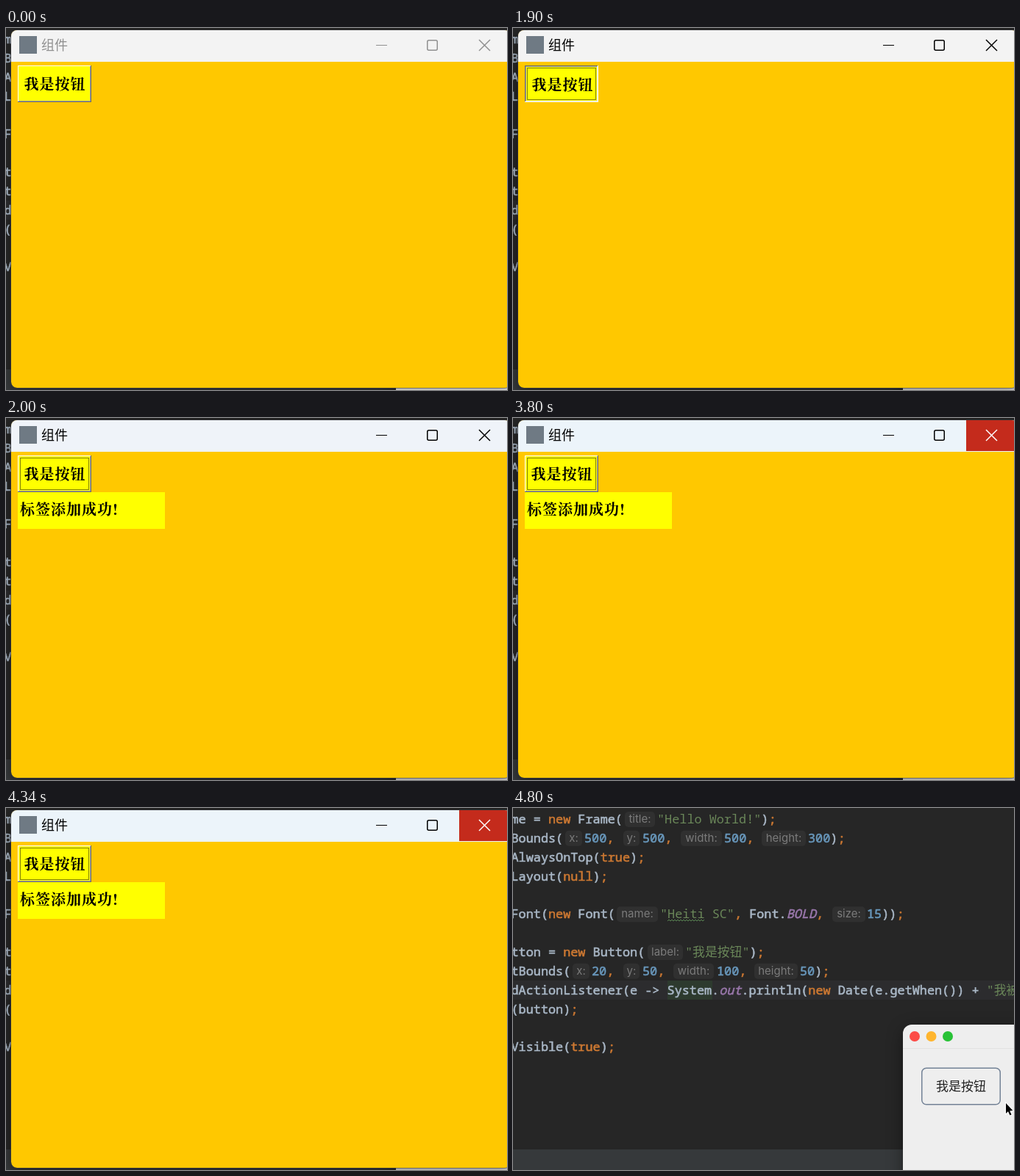
These frames come from a looping animation (681 px wide and 493 px high, 5 s). An HTML page with a canvas:

```html
<!DOCTYPE html>
<html lang="zh">
<head>
<meta charset="utf-8">
<title>组件</title>
<style>
html, body { margin: 0; width: 681px; height: 493px; overflow: hidden; background: #262626; }
canvas { display: block; }
</style>
</head>
<body>
<canvas id="stage" width="681" height="493"></canvas>
<script>
const W = 681, H = 493, LOOP = 5000, PAD = 20;
const MONO = '"Noto Sans Mono", "Noto Sans CJK SC", monospace';
const SANS = '"Noto Sans CJK SC", "Noto Sans CJK", sans-serif';
const SERIF = '"Noto Serif CJK SC", "Noto Sans CJK SC", "Noto Sans CJK", serif';
const CODE_SIZE = 16.84, CODE_X = -2.5, BASE_Y = 21, LINE_H = 25.85;
const INK = { p: '#a9b7c6', k: '#cc7832', s: '#6a8759', n: '#6897bb', f: '#9876aa' };

const ctx = document.getElementById('stage').getContext('2d');
const layer = document.createElement('canvas');
layer.width = 720 + PAD;
layer.height = 520 + PAD;
const win = layer.getContext('2d');

// Line number, then tokens [style, text, x]; without x a token follows the one before.
// Style h is a parameter hint: [h, text, left, right].
const CODE = [
  [0, ['p', 'me = '], ['k', 'new'], ['p', ' Frame('], ['h', 'title:', 152, 193],
    ['s', '"Hello World!"', 196], ['p', ')'], ['k', ';']],
  [1, ['p', 'Bounds('], ['h', 'x:', 71, 94], ['n', '500', 97], ['k', ','],
    ['h', 'y:', 150, 172], ['n', '500', 176], ['k', ','],
    ['h', 'width:', 228, 284], ['n', '500', 287], ['k', ','],
    ['h', 'height:', 338, 398], ['n', '300', 401], ['p', ')'], ['k', ';']],
  [2, ['p', 'AlwaysOnTop('], ['k', 'true'], ['p', ')'], ['k', ';']],
  [3, ['p', 'Layout('], ['k', 'null'], ['p', ')'], ['k', ';']],
  [5, ['p', 'Font('], ['k', 'new'], ['p', ' Font('], ['h', 'name:', 141, 197],
    ['s', '"Heiti SC"', 200], ['k', ', '], ['p', 'Font.'], ['f', 'BOLD'], ['k', ','],
    ['h', 'size:', 434, 479], ['n', '15', 481], ['p', '))'], ['k', ';']],
  [7, ['p', 'tton = '], ['k', 'new'], ['p', ' Button('], ['h', 'label:', 183, 231],
    ['s', '"我是按钮"', 234], ['p', ')'], ['k', ';']],
  [8, ['p', 'tBounds('], ['h', 'x:', 81, 104], ['n', '20', 107], ['k', ','],
    ['h', 'y:', 150, 172], ['n', '50', 176], ['k', ','],
    ['h', 'width:', 218, 273], ['n', '100', 277], ['k', ','],
    ['h', 'height:', 328, 387], ['n', '50', 390], ['p', ')'], ['k', ';']],
  [9, ['p', 'dActionListener(e -> System.'], ['f', 'out'], ['p', '.println('], ['k', 'new'],
    ['p', ' Date(e.getWhen()) + '], ['s', '"我被']],
  [10, ['p', '(button)'], ['k', ';']],
  [12, ['p', 'Visible('], ['k', 'true'], ['p', ')'], ['k', ';']]
];

function box(c, x, y, w, h, color) {
  c.fillStyle = color;
  c.fillRect(x, y, w, h);
}

function round(c, x, y, w, h, r) {
  c.beginPath();
  c.roundRect(x, y, w, h, r);
}

function poly(c, pts) {
  c.beginPath();
  pts.forEach(([x, y], i) => i ? c.lineTo(x, y) : c.moveTo(x, y));
}

function label(c, text, x, y, font, color, align = 'left') {
  c.font = font;
  c.fillStyle = color;
  c.textAlign = align;
  c.fillText(text, x, y);
}

function shadow(c, color, blur, dy) {
  c.shadowColor = color;
  c.shadowBlur = blur;
  c.shadowOffsetY = dy;
}

function hint(text, left, right, y) {
  round(ctx, left, y - 16, right - left, 21, 5);
  ctx.fillStyle = '#303030';
  ctx.fill();
  label(ctx, text, (left + right) / 2, y - 1, '15px Inter, sans-serif', '#7b7b7b', 'center');
}

function drawCode() {
  for (const [row, ...tokens] of CODE) {
    const y = BASE_Y + row * LINE_H;
    let x = CODE_X;
    for (const [style, text, at, right] of tokens) {
      if (style === 'h') {
        hint(text, at, right, y);
        continue;
      }
      if (at !== undefined) x = at;
      const face = style === 'f' ? 'italic ' : '';
      label(ctx, text, x, y, `${face}${CODE_SIZE}px ${MONO}`, INK[style]);
      // a hairline outline gives the medium weight; strings stay lighter
      if (style !== 's') {
        ctx.strokeStyle = INK[style];
        ctx.lineWidth = 0.6;
        ctx.strokeText(text, x, y);
      }
      x += ctx.measureText(text).width;
    }
  }
  // spelling mark
  const wave = [];
  for (let x = 210; x <= 260; x += 2) wave.push([x, x % 4 ? 154 : 152]);
  poly(ctx, wave);
  ctx.strokeStyle = '#5c8a55';
  ctx.lineWidth = 1;
  ctx.stroke();
}

function drawMacWindow() {
  ctx.save();
  shadow(ctx, 'rgba(0,0,0,.4)', 22, 6);
  round(ctx, 530, 295, 300, 300, 12);
  ctx.fillStyle = '#eeeeee';
  ctx.fill();
  ctx.restore();
  box(ctx, 530, 327, 151, 1, '#e2e2e2');
  ['#fc4b47', '#ffb52e', '#28c236'].forEach((color, i) => {
    ctx.beginPath();
    ctx.arc(546 + 22.5 * i, 311, 7, 0, 7);
    ctx.fillStyle = color;
    ctx.fill();
  });
  round(ctx, 555.75, 354.25, 106.5, 49.5, 6);
  ctx.strokeStyle = '#738296';
  ctx.lineWidth = 1.5;
  ctx.stroke();
  label(ctx, '我是按钮', 609, 385, '17px ' + SANS, '#222', 'center');
}

function drawCursor() {
  poly(ctx, [[670, 402], [670, 416], [673, 413.2], [675.4, 418.6],
    [677.6, 417.6], [675.2, 412.4], [679.4, 412]]);
  ctx.closePath();
  ctx.strokeStyle = '#fff';
  ctx.lineWidth = 2;
  ctx.stroke();
  ctx.fillStyle = '#000';
  ctx.fill();
}

function drawDesktop() {
  box(ctx, 0, 0, W, H, '#262626');
  box(ctx, 0, 235, W, 26, '#2c2c2e');
  box(ctx, 210, 235, 61, 26, '#2d3a2e');
  box(ctx, 0, 465, W, 28, '#36393b');
  drawCode();
  drawMacWindow();
  drawCursor();
}

function drawControls(color, { hover, closing }) {
  win.strokeStyle = color;
  win.lineWidth = 1;
  poly(win, [[503, 23.5], [518, 23.5]]);
  win.stroke();
  win.lineWidth = 1.5;
  round(win, 572.75, 16.75, 13.5, 13.5, 2);
  win.stroke();
  if (hover) {
    box(win, 616, 3, 80, 42, '#c42b1c');
    win.strokeStyle = '#fff';
  }
  if (closing) return;
  poly(win, [[643, 16], [658, 31]]);
  win.stroke();
  poly(win, [[658, 16], [643, 31]]);
  win.stroke();
}

function bevel(x, y, w, h, light, dark) {
  box(win, x, y, w, h, dark);
  box(win, x, y, w - 1, h - 1, light);
}

function drawButton({ pressed, active }) {
  if (pressed) {
    bevel(16, 51, 100, 50, '#696969', '#ffffff');
    bevel(17, 52, 98, 48, '#a0a0a0', '#e3e3e3');
  } else {
    bevel(16, 51, 100, 50, '#ffffff', '#696969');
    bevel(17, 52, 98, 48, '#ffff00', '#a0a0a0');
  }
  box(win, 18, 53, 96, 46, '#ffff00');
  if (active) {
    win.setLineDash([1, 1]);
    win.strokeStyle = '#000';
    win.lineWidth = 1;
    win.strokeRect(19.5, 54.5, 93, 43);
    win.setLineDash([]);
  }
  const d = pressed ? 1 : 0;
  win.letterSpacing = '1px';
  label(win, '我是按钮', 24.5 + d, 83.5 + d, 'bold 20px ' + SERIF, '#000');
  win.letterSpacing = '0px';
}

function drawWindow(s) {
  win.setTransform(1, 0, 0, 1, 0, 0);
  win.clearRect(0, 0, layer.width, layer.height);
  win.translate(PAD, PAD);

  win.save();
  shadow(win, s.active ? 'rgba(0,0,0,.5)' : 'rgba(0,0,0,.35)', 14, 3);
  round(win, 7, 3, 679, 487, 8);
  win.fillStyle = '#ffc800';
  win.fill();
  win.restore();
  round(win, 6.5, 2.5, 680, 488, 8.5);
  win.strokeStyle = 'rgba(62,62,66,.6)';
  win.lineWidth = 1;
  win.stroke();

  win.save();
  round(win, 7, 3, 679, 487, 8);
  win.clip();
  box(win, 7, 3, 679, 43, s.bar);
  const ink = s.active ? '#000' : '#909090';
  box(win, 18, 11, 24, 24, '#6f7a84');
  label(win, '组件', 48, 30, '18px ' + SANS, ink);
  drawControls(ink, s);
  drawButton(s);
  if (s.added) {
    box(win, 16, 101, 200, 50, '#ffff00');
    win.letterSpacing = '1px';
    label(win, '标签添加成功!', 19, 131.5, 'bold 20px ' + SERIF, '#000');
    win.letterSpacing = '0px';
  }
  win.restore();
}

function stateAt(t) {
  return {
    active: t >= 1900,
    pressed: t >= 1900 && t < 2000,
    added: t >= 2000,
    hover: t >= 3800,
    closing: t >= 4700,
    gone: t >= 4800,
    bar: t < 2000 ? '#f3f3f3' : t < 3800 ? '#eff3f9' : '#ecf4fa'
  };
}

function render(t) {
  const s = stateAt(t);
  drawDesktop();
  if (s.gone) return;
  drawWindow(s);
  ctx.save();
  if (s.closing) {
    ctx.globalAlpha = 0.5;
    ctx.translate(7.2, 5.6);
    ctx.scale(0.972, 0.972);
  }
  ctx.drawImage(layer, -PAD, -PAD);
  ctx.restore();
}

let start;
function tick(now) {
  start ??= now;
  render((now - start) % LOOP);
  requestAnimationFrame(tick);
}
requestAnimationFrame(tick);
</script>
</body>
</html>
```
